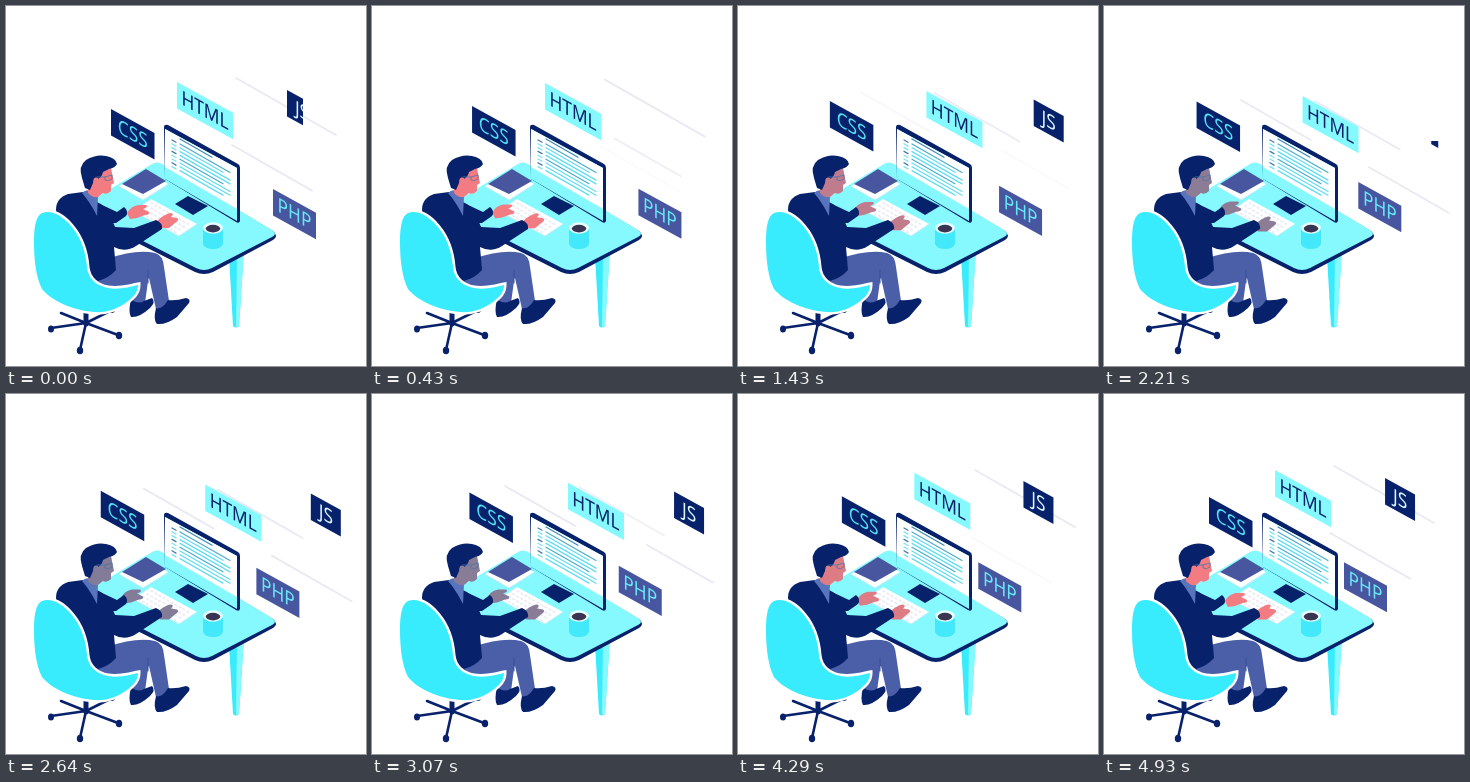
These frames come from a looping animation (360x360 px, 5000 ms). An HTML page:

```html
<!DOCTYPE html>
<html lang="en">
<head>
<meta charset="utf-8">
<title>Developer at a desk</title>
<style>
html, body { margin: 0; width: 100%; height: 100%; overflow: hidden; background: #fff; }
svg { display: block; width: 100%; height: 100%; }
text { font-family: "Noto Sans", "Open Sans", sans-serif; font-size: 20px; font-weight: 400; text-anchor: middle; }
.navy { fill: #08216b; }
.pale { fill: #86f9fe; }
.cyan { fill: #38ebfd; }
.blue { fill: #4a5fa8; }
.skin { fill: var(--skin); }
.line { fill: none; stroke-linecap: round; stroke-linejoin: round; }
</style>
</head>
<body>
<svg id="stage" viewBox="0 0 360 360">
  <defs>
    <clipPath id="jsClip"><rect id="jsWindow" height="60"/></clipPath>
  </defs>
  <g id="streaks" class="line" stroke="#e9e9f4" stroke-width="1.8"></g>
  <g id="labels"></g>

  <g id="desk">
    <path class="cyan" d="M223 250L238 243L233 320Q230 323 227 320Z"/>
    <path class="pale" d="M231 247L238 243L233 320L230 321Z"/>
    <path class="navy" d="M76 203L146 159Q151 156 156 159L267 225Q273 230 267 234L207 266Q198 270 189 266L76 209Z"/>
    <path class="pale" d="M76 200L146 158Q151 155 156 158L266 224Q272 228 266 231L206 262Q198 266 190 262L76 204Z"/>
  </g>

  <g id="notebook">
    <path d="M113 180L139 165L162 178L137 194Z" fill="#fff"/>
    <path class="line" d="M114 181L137 194L161 180" stroke="#bfeaf8" stroke-width=".8"/>
    <path d="M116 178L140 163L160 175L137 188Z" fill="#47569e"/>
  </g>

  <g id="monitor">
    <path class="navy" d="M169 198L182 190L202 200L187 209Z"/>
    <path class="navy" d="M158 121Q158 118 162 119L232 158Q234 159 234 162L234 215Q233 218 230 216L159 173Z"/>
    <path class="pale" d="M159 123L231 162L231 215L159 173Z"/>
    <path d="M159 123L231 162L231 203L159 161Z" fill="#fff"/>
    <g id="code" class="line" stroke-width="1.3"></g>
  </g>

  <g id="keyboard">
    <path d="M127 205L145 193L191 218L173 230Z" fill="#fff"/>
    <path class="line" d="M127 205L173 230L191 218" stroke="#c9eef8" stroke-width="1"/>
    <g id="keys" fill="none" stroke="#ebecf4" stroke-width="1.8" stroke-dasharray="3 1.6"></g>
  </g>

  <g id="cup">
    <path d="M197 222L197 238Q199 243 207 243Q215 243 217 238L217 222Z" fill="#43e9fa"/>
    <ellipse cx="207" cy="222" rx="10" ry="5.7" fill="#e6fdff"/>
    <ellipse cx="207" cy="222.6" rx="7.2" ry="3.8" fill="#393452"/>
  </g>

  <g id="legs">
    <path class="blue" d="M101 253Q130 243 149 247Q157 249 158 261L163 295Q157 303 150 303L143 272L122 288L88 283Z"/>
    <path class="blue" d="M88 270Q122 250 136 259Q143 264 142 275L139 297Q131 300 125 294L125 280L94 289Z"/>
    <path class="line" d="M142 264L142 277" stroke="#384f98" stroke-width="1"/>
    <path class="navy" d="M150 302Q156 304 162 294Q170 295 180 292Q185 293 183 297L171 311Q160 319 151 318Q147 314 150 302Z"/>
    <path class="navy" d="M125 293Q132 299 138 295L146 292Q150 296 144 302Q133 312 125 311Q122 306 125 293Z"/>
  </g>

  <g id="man">
    <path id="leftHand" class="skin" d="M116 204Q120 197 127 196L135 196Q138 198 132 200L138 203Q139 206 134 206L126 209L119 210Z"/>
    <path id="rightHand" class="skin" d="M151 215Q157 209 164 207Q169 207 165 211L171 212Q174 214 169 217L163 222L154 222Z"/>
    <path class="navy" d="M94 198L111 206L118 201Q123 205 120 210L110 217L96 217Z"/>
    <path class="navy" d="M50 204Q50 192 62 188L77 186L91 196Q101 200 105 211L109 221L128 222L150 214Q157 217 156 223L130 240Q119 247 108 241L110 264Q103 272 92 275L78 268Q78 222 51 209Z"/>
    <path d="M76 187Q80 183 84 185L92 190L91 210Q84 196 76 187Z" fill="#5874bd"/>
    <path class="skin" d="M82 178L90 164L105 162L108 177L105 179L105 185Q101 189 97 187L92 191Q86 192 82 187Z"/>
    <path class="navy" d="M76 172Q72 160 80 154Q90 148 100 150Q110 152 111 158Q109 162 103 163L97 166Q96 171 92 173Q88 171 87 177L84 184L79 182Z"/>
    <ellipse class="skin" cx="90" cy="175" rx="2.6" ry="3.4"/>
    <path class="line" d="M91 171L99 171L106 169L106 173Q102 176 99 174L99 171" stroke="#4a77a8" stroke-width=".8"/>
  </g>

  <g id="chair">
    <g class="line" stroke="#08216b">
      <path d="M80 304L80 318" stroke-width="5"/>
      <path d="M80 317L45 322M80 317L74 344M80 317L112 329M80 317L106 304M80 317L55 307" stroke-width="2.6"/>
    </g>
    <g class="navy">
      <ellipse cx="45" cy="323" rx="3" ry="3.6"/>
      <ellipse cx="74" cy="344.5" rx="3.2" ry="3.8"/>
      <ellipse cx="113" cy="329.5" rx="3.2" ry="3.8"/>
      <ellipse cx="106" cy="303.5" rx="3" ry="3.4"/>
    </g>
    <path class="cyan" stroke="#fff" stroke-width="5" paint-order="stroke" d="M36 207C46 203 58 211 66 221C76 233 80 248 81 261C82 273 91 280 102 282C113 284 123 281 132 279C132 287 127 291 121 296C111 303 101 307 88 306C66 304 46 295 36 283C30 271 28 254 28 236C28 220 30 210 36 207Z"/>
  </g>
</svg>
<script>
const LOOP = 5000, SLOPE = 0.57;
const byId = id => document.getElementById(id);
const add = (parent, tag, attrs) => {
  const el = document.createElementNS("http://www.w3.org/2000/svg", tag);
  for (const k in attrs) el.setAttribute(k, attrs[k]);
  parent.appendChild(el);
  return el;
};
const ease = p => (1 - Math.cos(Math.PI * Math.min(1, p))) / 2;
const shift = (el, x, y) => el.setAttribute("transform", `translate(${x.toFixed(2)} ${y.toFixed(2)})`);
const slant = (x, y, len) => `M${x} ${y}l${len} ${len * SLOPE}`;

// Isometric name plates
function label(name, w, fill, ink) {
  const g = add(byId("labels"), "g", {});
  const drop = w * 0.55;
  add(g, "path", { d: `M0 0L${w} ${drop}V${drop + 26.5}L0 26.5Z`, fill });
  const text = add(g, "text", { transform: `matrix(.866 .476 0 1 ${w / 2} ${drop / 2 + 19.8})`, fill: ink });
  text.textContent = name;
  return g;
}
const html = label("HTML", 56, "#86f9fe", "#08216b");
const css = label("CSS", 43.5, "#08216b", "#52dff5");
const php = label("PHP", 43, "#47569e", "#67e8fa");
const js = label("JS", 30, "#08216b", "#dcf8ff");
js.setAttribute("clip-path", "url(#jsClip)");

// The JS plate drops out twice: first from the right, then down to its lower corner
function clipJs(t) {
  const corner = t > 1790 && t < 2500;
  const width = t < 300 ? 17 : t < 1200 ? 0 : 32;
  const box = byId("jsWindow");
  box.setAttribute("x", corner ? 23 : -1);
  box.setAttribute("y", corner ? 36 : -1);
  box.setAttribute("width", width);
}

// Faint streaks drift along their lanes and pulse
const streaks = [
  { peak: 0, beats: 1, x: 230, y: 72, len: 100 },
  { peak: 2200, beats: 1, x: 172, y: 73, len: 85 },
  { peak: 860, beats: 2, x: 240, y: 131, len: 66 },
  { peak: 2350, beats: 2, x: 226, y: 139, len: 80 },
  { peak: 2500, beats: 1, x: 98, y: 72, len: 70 }
];
for (const s of streaks) s.el = add(byId("streaks"), "path", { d: slant(s.x, s.y, s.len) });

// Text on the monitor and rows of keys
const code = byId("code");
add(code, "path", { d: slant(174, 133, 32), stroke: "#3e8cb8" });
for (let i = 0; i < 8; i++) {
  const y = 138 + i * 3.8;
  add(code, "path", { d: slant(166, y - 4, 4), stroke: i % 3 ? "#79e2f0" : "#4a79ae" });
  add(code, "path", { d: slant(174, y, i % 3 === 1 ? 43 : 50), stroke: i % 4 ? "#62dcef" : "#4faecb" });
}
for (let i = 0; i < 4; i++) add(byId("keys"), "path", { d: slant(132 + i * 4.2, 205 - i * 2.8, 40) });

const pink = [242, 124, 130], shade = [130, 124, 152];

function draw(t) {
  const p = t / LOOP;
  const swing = ease(2 * p > 1 ? 2 - 2 * p : 2 * p);
  const back = 13.5 * Math.sin(Math.PI * p ** 0.643) ** 2;
  const slide = 27 * ease(t / 4600);
  shift(html, 171 + 28.5 * swing, 76 + 14.5 * swing);
  shift(css, 105 - back, 103 - back * 0.6);
  shift(php, 267 - slide, 183 - slide * 0.55);
  shift(js, 281 + 24 * swing, 84 + 15.5 * swing);
  clipJs(t);

  for (const s of streaks) {
    const wave = Math.cos(2 * Math.PI * s.beats * (t - s.peak) / LOOP);
    s.el.setAttribute("opacity", Math.max(0, Math.min(1, wave * 1.6)).toFixed(2));
    const drift = 40 * swing;
    shift(s.el, drift, drift * SLOPE);
  }

  const reach = 6 * (1 - swing) ** 2 - 1;
  shift(byId("leftHand"), reach, reach * 0.6);
  shift(byId("rightHand"), 0, 3.5 * ease(t / 2500));

  // Skin darkens late in the loop and returns
  const dim = Math.max(0, Math.sin(Math.PI * (t - 900) / 3600));
  const tone = pink.map((c, i) => Math.round(c + (shade[i] - c) * dim));
  byId("stage").style.setProperty("--skin", `rgb(${tone})`);
}

function tick() {
  draw(performance.now() % LOOP);
  requestAnimationFrame(tick);
}
tick();
</script>
</body>
</html>
```
